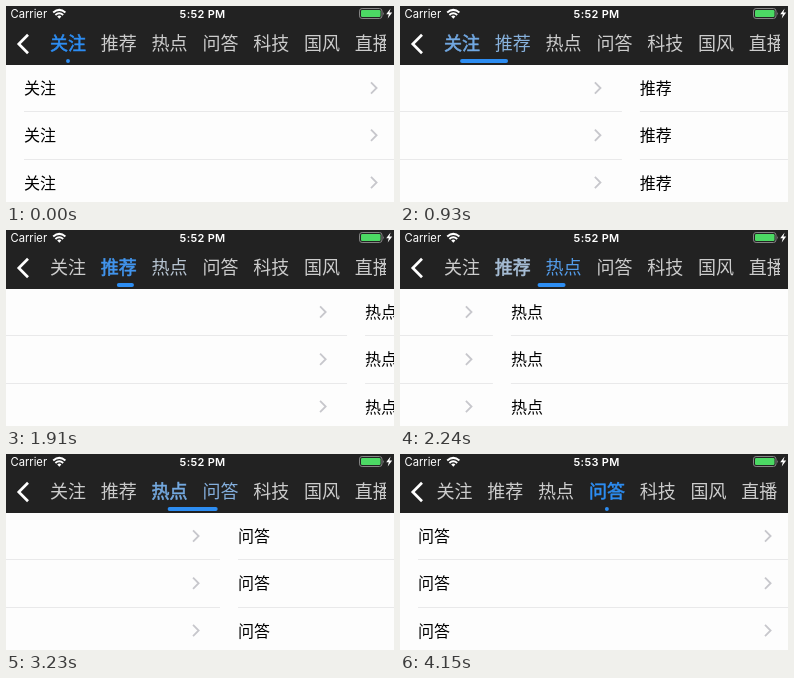
An HTML page that plays this animation: 388x196 px, repeating every 4.51 s.

```html
<!DOCTYPE html>
<html lang="zh-CN">
<head>
<meta charset="utf-8">
<title>Tab pager</title>
<style>
  html, body { margin: 0; width: 100%; height: 100%; overflow: hidden; background: #fdfdfd; }
  svg { display: block; width: 388px; height: 196px; }
  text { font-family: "Noto Sans CJK SC", "Noto Sans CJK", sans-serif; }
  .status { font-family: Inter, Roboto, sans-serif; fill: #fff; }
  .line { fill: none; }
</style>
</head>
<body>
<svg viewBox="0 0 388 196">
  <defs><clipPath id="tabClip"><rect x="34" y="20" width="346" height="38"/></clipPath></defs>
  <g id="pages"></g>
  <rect width="388" height="59" fill="#222"/>

  <text class="status" x="4.5" y="12" font-size="11.2">Carrier</text>
  <g class="line" stroke="#fff" stroke-width="2">
    <path d="M47.2 6.4Q53.3 1.4 59.4 6.4"/>
    <path d="M49.4 8.9Q53.3 5.6 57.2 8.9"/>
  </g>
  <path d="M51.2 10.4Q53.3 8.8 55.4 10.4L53.3 12.7Z" fill="#fff"/>
  <text class="status" id="clock" x="196.6" y="12" font-size="11" font-weight="600" letter-spacing=".3" text-anchor="middle">5:52 PM</text>
  <rect x="353.5" y="2.5" width="22.5" height="10" rx="2.6" fill="none" stroke="#858585"/>
  <rect x="355" y="4" width="19.5" height="7" rx="1.2" fill="#4cd964"/>
  <path d="M377 6q1.7 1.5 0 3.4z" fill="#858585"/>
  <path d="M384.6 2.6L380.2 8.3H382.8L381.7 12.6L386.2 6.6H383.4Z" fill="#fff"/>

  <path class="line" d="M22 28.8L12.8 38L22 47.2" stroke="#fff" stroke-width="2.7"/>
  <g clip-path="url(#tabClip)"><g id="tabs"></g></g>
</svg>
<script>
const LOOP = 4510, TICK = 30;
const PAGE = 392, ROW = 47.25, TAB_STEP = 50.8, TAB_LEFT = 44, DOT = 3.9;
const NAMES = ["关注", "推荐", "热点", "问答", "科技", "国风", "直播"];
const GREY = [204, 204, 204], BLUE = [45, 141, 242];

// The finger drags a share of the page until release, then the page glides home.
const SWIPES = [
  { start: 690, drag: 240, share: .434 },
  { start: 1730, drag: 510, share: .763 },
  { start: 2990, drag: 240, share: .454 }
];
const GLIDE = 88, SNAP = .007;
const SCROLL = { start: 3620, length: 260, distance: 7.5 };

const byId = id => document.getElementById(id);
function add(parent, tag, attrs, text = "") {
  const el = document.createElementNS("http://www.w3.org/2000/svg", tag);
  for (const key in attrs) el.setAttribute(key, attrs[key]);
  el.textContent = text;
  return parent.appendChild(el);
}

const pages = byId("pages"), tabs = byId("tabs"), clock = byId("clock");
for (let page = 0; page < 4; page++) {
  const group = add(pages, "g", { transform: `translate(${page * PAGE})` });
  for (let row = 0; row < 3; row++) {
    const y = 82 + row * ROW;
    add(group, "text", { x: 18, y: y + 6, "font-size": 16, fill: "#000" }, NAMES[page]);
    add(group, "path", { class: "line", d: `M365 ${y - 5.6}l5.6 5.6l-5.6 5.6`, stroke: "#c7c7cc", "stroke-width": 1.8 });
    add(group, "rect", { x: 18, y: Math.round(y + 23.4), width: PAGE - 18, height: 1, fill: "#e9e9ea" });
  }
}
const labels = NAMES.map((name, i) =>
  add(tabs, "text", { x: TAB_LEFT + i * TAB_STEP, y: 44.4, "font-size": 18 }, name));
const indicator = add(tabs, "rect", { y: 53, height: DOT, rx: DOT / 2, fill: `rgb(${BLUE})` });

function swipeShare(time, { start, drag, share }) {
  const t = Math.floor((time - start) / TICK) * TICK;
  if (t <= 0) return 0;
  if (t <= drag) return share * (t / drag) ** 1.7;
  const rest = (1 - share) * Math.exp((drag - t) / GLIDE);
  return rest < SNAP ? 1 : 1 - rest;
}

function scrollAt(time) {
  const k = Math.min(1, Math.max(0, (time - SCROLL.start) / SCROLL.length));
  return SCROLL.distance * k * k * (3 - 2 * k);
}

function draw(time) {
  const page = SWIPES.reduce((sum, swipe) => sum + swipeShare(time, swipe), 0);
  const selected = Math.floor(page), share = page - selected;
  pages.setAttribute("transform", `translate(${-page * PAGE})`);
  tabs.setAttribute("transform", `translate(${-scrollAt(time)})`);

  labels.forEach((label, i) => {
    const tint = Math.max(0, 1 - Math.abs(i - page));
    const color = `rgb(${GREY.map((c, n) => Math.round(c + (BLUE[n] - c) * tint))})`;
    label.setAttribute("fill", color);
    // A thin outline gives the selected label its medium weight.
    label.setAttribute("stroke", i === selected ? color : "none");
    label.setAttribute("stroke-width", .55);
  });

  // The front edge runs ahead in the first half, the back edge follows in the second.
  const back = Math.max(0, share * 2 - 1), front = Math.min(1, share * 2);
  const home = TAB_LEFT + 18 - DOT / 2 + selected * TAB_STEP;
  indicator.setAttribute("x", home + back * TAB_STEP);
  indicator.setAttribute("width", DOT + (front - back) * TAB_STEP);

  clock.textContent = time < 4150 ? "5:52 PM" : "5:53 PM";
}

const origin = performance.now();
function tick() {
  draw((performance.now() - origin) % LOOP);
  requestAnimationFrame(tick);
}
tick();
</script>
</body>
</html>
```
